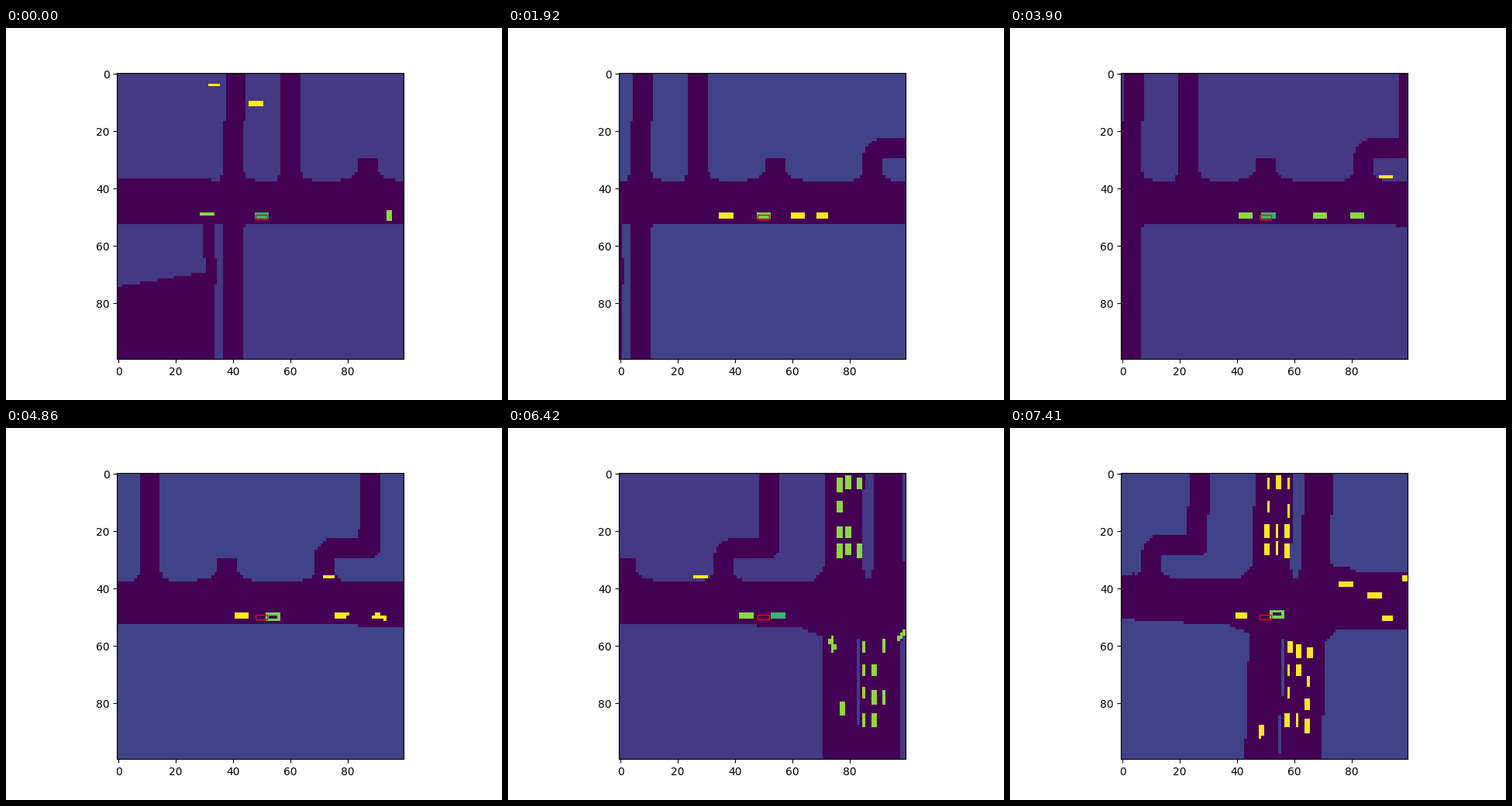
A matplotlib script for the animation above (7440 ms loop, 640 px wide and 480 px high).

```python
import numpy as np
import matplotlib.pyplot as plt
from matplotlib.animation import FuncAnimation
from matplotlib.patches import Rectangle

FRAMES, STEP, N = 248, 30, 100
CAR, LEAD = 5, 4
TILT = 0.012
row, col = np.mgrid[0:N, 0:N] + 0.5


def shift(i):
    """Distance driven, in cells: brake, wait, pull away, cruise."""
    if i < 60.7:
        return 33 * (1 - (1 - i / 60.7) ** 2)
    if i < 98.7:
        return 33
    if i < 190:
        return 33 + 0.004083 * (i - 98.7) ** 2
    return np.interp(i, [190, 214, 247], [67, 85, 111.4])


def spin(i):
    return np.interp(i, [214, 247], [0, 0.025])


def flare(dist, widths):
    """Extra road width by distance from the crossing."""
    table = np.append(widths, 0)
    k = np.floor(dist).astype(int)
    return np.where(k < 0, 0, table[np.clip(k, 0, len(widths))])


MOUTH, WIDE = (4, 1, 1), (6, 2, 1)
RAMP = (4, 3, 2, 1, 1)
MEDIAN = (9, 1, 1, 1)


def roads(x, y):
    """True where the world point is drivable."""
    xv = x + TILT * (y - 50)
    top = np.select([x < 33, x < 183], [37, 38], 34.5)
    bottom = np.select([x < 133, x < 183], [53, 54], 54.6)
    free = (y >= top) & (y < bottom)

    def street(dist, left, width, fl, fr):
        return ((dist >= 0) & (xv >= left - flare(dist, fl))
                & (xv < left + width + flare(dist, fr)))

    above, below = top - y - 1e-6, y - bottom
    free |= street(above, 37.1, 7, (1, 1), MOUTH)
    free |= street(below, 37.1, 7, (0,), (1,))
    free |= street(above, 56.7, 7, MOUTH[1:], MOUTH)
    free |= street(above, 83.7, 7, WIDE, WIDE) & (y >= 30)
    free |= street(above, 117.7, 7, (3, 1), (3, 1)) & (y >= 30)
    free |= street(above, 156.5, 13.47, RAMP, MEDIAN)
    free |= street(above, 173.6, 10, MEDIAN, (9, 7, 1))
    divider = (abs(xv - 168.57) < 0.38) & (abs(y - 78) < 20)
    free |= street(below, 156.5, 26.7, (7.2, 5.2, 2.2), RAMP[1:]) & ~divider

    # lane bending into the upper street
    bend = abs(x - 125) ** 1.8 + abs(y - 30) ** 1.8 < 7 ** 1.8
    free |= bend & (x < 125) & (y < 30)
    free |= (x >= 125) & (x < 138) & (y >= 23) & (y < 30)
    free |= (abs(xv - 137.05) < 3.55) & (y < 30) & (xv + y < 168.6)

    # yard and its driveway
    kink = (y >= 65).astype(int)
    free |= (x < 34) & (y > 74.8 - 0.165 * x)
    free |= (x >= 30 + kink) & (x < 34 + kink) & (y >= 53) & (y < 74)
    return free


class Car:
    """A path through timed points; heading None follows the path."""

    def __init__(self, t, x, y, length=5, width=2, heading=0):
        self.t, self.x, self.y = t, x, y
        self.length, self.width, self.heading = length, width, heading

    def at(self, i, v):
        return np.interp(i, self.t, v) if np.ndim(v) else v

    def seen(self, i):
        return self.t[0] <= i <= self.t[-1]

    def pose(self, i):
        x, y = self.at(i, self.x), self.at(i, self.y)
        angle = self.heading
        if angle is None:
            dx = self.at(i + 2, self.x) - self.at(i - 2, self.x)
            dy = self.at(i + 2, self.y) - self.at(i - 2, self.y)
            angle = np.degrees(np.arctan2(dy, dx))
        return x, y, angle, self.at(i, self.length), self.at(i, self.width)


# placed relative to the view
follower = Car([0, 29, 64, 130, 214, 247],
               [31.5, 29.5, 37.5, 43.5, 44.3, 42],
               [49.5, 50, 50, 50, 50, 50],
               length=[5, 5, 5, 5, 5, 4], width=[1, 2, 2, 2, 2, 2])
lead = Car([0, 29, 64, 130, 190, 214, 247],
           [50.5, 47.5, 50.5, 51.5, 57.5, 55.5, 54.5],
           [50, 50, 50, 50, 50.5, 50, 49.5],
           width=[2, 2, 2, 2, 3, 2, 3])

# placed in the world
cars = [
    Car([0, 29, 44], [34, 34.5, 34.5], 4.5, length=[4, 5, 5], width=1),
    Car([0, 44], [48.5, 47], [11, 20.1]),
    Car([0, 4], 95, 50, 4, 2, 90),
    Car([88, 247], [137.2, 107.5], 36.5, 4.5, 1),
]
cars.append(Car([5, 92, 112, 130, 160, 190, 204, 214, 222, 247],
                [95.5, 95.5, 98.5, 106.5, 126, 148, 156, 159.5, 161, 161.3],
                [50, 50, 50, 50, 50, 51, 54, 60, 67, 90.5],
                4.8, 1.8, None))
cars.append(Car([0, 60], [103, 104], [50.5, 50], 4, [1, 2]))
cars.append(Car([61, 92, 130, 160, 180, 190, 198, 214, 235],
                [104, 104, 119.5, 140, 153.5, 158.8, 162, 163, 163],
                [50, 50, 50, 50, 53.5, 58, 66, 82.5, 105],
                4.8, 1.7, None))
cars.append(Car([190, 214, 226, 247], [181, 183.5, 190, 204.4],
                [66, 57, 52, 50.4], 4.5, 1.7, None))

for x, y in (189.5, 38.7), (199.6, 42.5), (211.6, 36.3):
    cars.append(Car([0, 247], x, y))


def queue(x, ys, start=0, drift=0):
    """Cars waiting in one lane of the cross street."""
    for y in ys:
        cars.append(Car([start, 214, 247] if start < 214 else [start, 247, 247],
                        x, [y, y, y + drift], 4.6, 1.7, 90))


queue(161.9, [4.5, 12.2, 21, 27.5])
queue(165.3, [3.6, 21, 27])
queue(168.9, [4.2, 27.5])
queue(168.9, [13.8, 20.5], 222)
queue(170.5, [61, 69, 77, 86.5])
queue(173.9, [69, 86.5])
queue(173.9, [62.5], 222)
queue(177.4, [60.5, 78.5], drift=2.5)
queue(177.4, [73, 88.5], 222)
cars.append(Car([0, 222], 173.9, 78.5, 4.6, 1.7, 90))


def box(cx, cy, deg, length, width):
    """Cells on the one-cell-thick outline of a turned rectangle."""
    a = np.radians(deg)
    dx, dy = col - cx, row - cy
    u = abs(dx * np.cos(a) + dy * np.sin(a)) + 1e-6
    v = abs(dy * np.cos(a) - dx * np.sin(a)) + 1e-6
    outer = (u <= length / 2) & (v <= width / 2)
    inner = (u < length / 2 - 1) & (v < width / 2 - 1)
    return outer & ~inner


def grid(i):
    s, q = shift(i), spin(i)
    x = col + s + q * (row - 50)
    y = row - q * (col - 65)
    mark = np.zeros((N, N), int)
    for car in cars:
        if car.seen(i):
            wx, wy, *shape = car.pose(i)
            cx = wx - s - q * (wy - 50)
            mark[box(cx, wy + q * (cx - 65), *shape)] = CAR
    mark[box(*follower.pose(i))] = CAR
    mark[box(*lead.pose(i))] = LEAD
    return mark + ~roads(x, y)


fig, ax = plt.subplots(figsize=(6.4, 4.8), dpi=100)
picture = ax.imshow(grid(0))
ax.add_patch(Rectangle((48, 49.25), 4, 1.5, fill=False, ec="r", lw=1))


def update(i):
    img = grid(i)
    picture.set_data(img)
    picture.set_clim(0, img.max())
    return [picture]


anim = FuncAnimation(fig, update, frames=FRAMES, interval=STEP,
                     repeat=True, repeat_delay=0)
plt.show()
```
